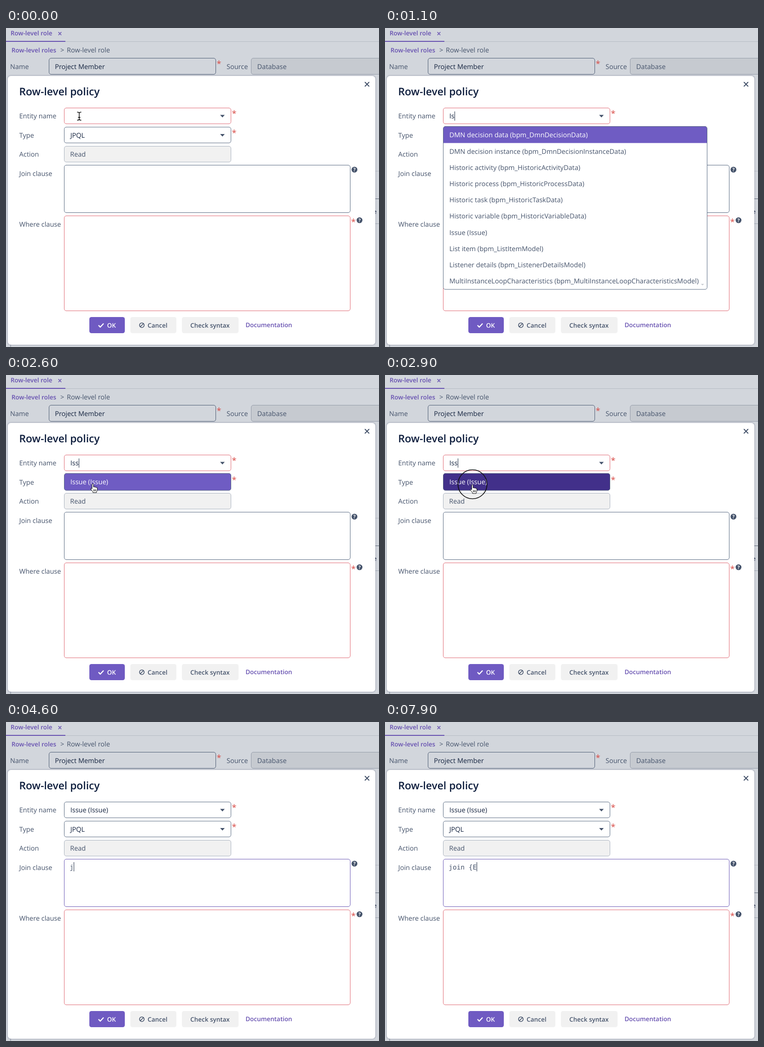
Recreate the animation shown at these times as an HTML page. Size 810 px wide and 692 px high, loop 8000 ms.

```html
<!DOCTYPE html>
<html lang="en">
<head>
<meta charset="utf-8">
<title>Row-level policy</title>
<style>
  html, body { margin: 0; width: 100%; height: 100%; overflow: hidden; background: #d2d6dc; }
  svg { display: block; width: 810px; height: 692px; }
  text { font: 14.5px "Open Sans", "Noto Sans", sans-serif; fill: #45536b; white-space: pre; text-rendering: geometricPrecision; }
  .semi { font-size: 13.45px; font-weight: 600; }
  .link { fill: #6650b0; }
  .dark { fill: #14233f; }
  .title { font-size: 22.8px; font-weight: 600; fill: #0c1c3c; }
  .mono { font: 14.45px "DejaVu Sans Mono", monospace; }
  .star { font-size: 18px; fill: #d84a45; text-anchor: middle; }
  .help { font-size: 10.5px; font-weight: 700; fill: #fff; text-anchor: middle; }
  .white { fill: #fff; }
  .field { fill: #fff; stroke: #596a82; }
  .error { stroke: #e06a75; }
  .focus { stroke: #6c5ab5; }
  .off { fill: #f1f1f1; stroke: #a9b1be; }
  .line { fill: none; stroke-linecap: round; stroke-linejoin: round; }
</style>
</head>
<body>
<svg viewBox="0 0 810 692" id="stage"></svg>
<script>
const stage = document.getElementById('stage');

function add(tag, attrs, parent = stage, content = '') {
  const node = document.createElementNS('http://www.w3.org/2000/svg', tag);
  for (const key in attrs) node.setAttribute(key, attrs[key]);
  node.textContent = content;
  parent.append(node);
  return node;
}
const label = (x, y, content, cls = '', parent = stage) => add('text', { x, y, class: cls }, parent, content);
const box = (x, y, right, bottom, attrs, parent = stage) =>
  add('rect', { x, y, width: right - x, height: bottom - y, rx: 4.5, ...attrs }, parent);
const field = (x, y, right, bottom, cls = '') => box(x, y, right, bottom, { class: 'field ' + cls });
const path = (d, attrs, parent = stage) => add('path', { d, ...attrs }, parent);
const stroke = (d, color, width) => path(d, { class: 'line', stroke: color, 'stroke-width': width });
const star = (x, y) => label(x, y + 10.3, '*', 'star');
const cross = (x, y, r, color, width) =>
  stroke(`M${x - r} ${y - r}l${2 * r} ${2 * r}M${x + r} ${y - r}l${-2 * r} ${2 * r}`, color, width);
const arrow = (x, y) => path(`M${x - 5} ${y - 2.5}h10l-5 5.5z`, { fill: '#45536b' });
function help(x, y) {
  add('circle', { cx: x, cy: y, r: 6.3, fill: '#45536b' });
  label(x, y + 3.8, '?', 'help');
}
const show = (node, visible) => { node.style.display = visible ? '' : 'none'; };

// Dimmed page
add('rect', { width: 810, height: 692, fill: '#d2d6dc' });
add('rect', { y: 29, width: 810, height: 1, fill: '#b6bbc4' });
add('rect', { y: 28, width: 129, height: 2, fill: '#6650b0' });
label(10, 16, 'Row-level role', 'semi link');
cross(117, 12.2, 2.8, '#6650b0', 1.5);
label(12, 53, 'Row-level roles', 'semi link');
label(118, 53, '>');
label(132, 53, 'Row-level role');
label(9, 88.5, 'Name');
box(93.5, 65.5, 455.5, 100.5, { fill: '#d2d6dc', stroke: '#4d5c74' });
label(106.2, 88.5, 'Project Member', 'dark');
star(462.5, 74);
label(479, 88.5, 'Source');
box(532.5, 65.5, 830, 100.5, { fill: '#c6cad0', stroke: '#949ca9' });
label(545.5, 88.5, 'Database');
for (const [y, color] of [[310, '#b6bbc4'], [370, '#596474'], [424, '#a0a7b2']])
  add('rect', { x: 790, y, width: 20, height: 1, fill: color });
label(797, 403, 'e', 'semi dark');
add('rect', { x: 9.5, y: 680, width: 1, height: 12, fill: '#7d8796' });

// Dialog
for (const spread of [3, 2, 1])
  box(4 - spread, 104 - spread, 802 + spread, 687 + spread, { fill: '#26344e', opacity: .05, rx: 7 + spread });
box(4, 104, 802, 687, { fill: '#fff', rx: 6.5 });
label(28.5, 145.8, 'Row-level policy', 'title');
cross(784, 122, 4.2, '#45536b', 2);
[['Entity name', 196], ['Type', 237.7], ['Action', 279], ['Join clause', 320.5], ['Where clause', 430.5]]
  .forEach(([name, y]) => label(28.8, y, name));

const entityBox = field(126.5, 173.5, 488.5, 207.8);
arrow(470, 191);
const entityText = label(139.7, 196, '', 'dark');
field(126.5, 215, 488.5, 249.3);
label(139.7, 237.7, 'JPQL', 'dark');
arrow(470, 232.5);
field(126.5, 256.5, 488.5, 290.8, 'off');
label(139.2, 279, 'Read');
const joinBox = field(126.5, 297.5, 747.5, 400.5);
const joinText = label(138.3, 319.5, '', 'mono');
field(126.5, 407.5, 747.5, 613.5, 'error');
star(495.5, 182);
star(495.5, 223.5);
star(754.5, 416.5);
help(756.7, 307.2);
help(767.7, 417);

box(181, 627, 258, 662, { fill: '#6f5ac2' });
stroke('M201.5 645.5l3.3 3.3 6.5-7', '#fff', 2.4);
label(219.5, 649.6, 'OK', 'semi white');
box(270, 627, 370, 662, { fill: '#f1f1f1' });
add('circle', { cx: 295, cy: 644.7, r: 5, fill: 'none', stroke: '#45536b', 'stroke-width': 1.6 });
stroke('M291.6 648.1l6.8-6.8', '#45536b', 1.6);
label(307.5, 649.6, 'Cancel', 'semi');
box(382, 627, 505, 662, { fill: '#f1f1f1' });
label(400.3, 649.6, 'Check syntax', 'semi');
label(520.2, 649, 'Documentation', 'semi link');

// Drop-down lists
function list(right, items) {
  const group = add('g', {});
  const bottom = items.length > 1 ? 567 : 250.3;
  box(126.5, 213.5, right, bottom, { fill: '#fff' }, group);
  const active = path(`M127 249.5V218q0-4.5 4.5-4.5H${right - 5}q4.5 0 4.5 4.5V249.5z`, { fill: '#6f5cc3' }, group);
  if (items.length === 1) active.setAttribute('d', `M131 213.5H${right - 4}q4 0 4 4V246q0 4-4 4H131q-4 0-4-4V217.5q0-4 4-4z`);
  box(126.5, 213.5, right, bottom, { fill: 'none', stroke: '#596a82' }, group);
  items.forEach((item, i) => label(139.7, 237.4 + i * 35.2, item, i ? '' : 'white', group));
  if (items.length > 1) path(`M${right - 13.5} 555h7l-3.5 3.5z`, { fill: '#c9cdd3' }, group);
  return { group, active };
}
const lists = {
  all: list(575.5, [
    'AbstractSingleFilterCondition (ui_AbstractSingleFilterCondition)',
    'Assignment details (bpm_AssignmentDetailsModel)',
    'AttributeResourceModel (sec_AttributeResourceModel)',
    'Business rule task (bpm_BusinessRuleTaskModel)',
    'Call activity (bpm_CallActivityModel)',
    'Call activity (bpm_SubProcessModel)',
    'ColumnDefinition (ColumnDefinition)',
    'Condition details (bpm_ConditionDetailsModel)',
    'Configuration (ui_FilterConfiguration)',
    'DMN decision data (bpm_DmnDecisionData)']),
  some: list(699.5, [
    'DMN decision data (bpm_DmnDecisionData)',
    'DMN decision instance (bpm_DmnDecisionInstanceData)',
    'Historic activity (bpm_HistoricActivityData)',
    'Historic process (bpm_HistoricProcessData)',
    'Historic task (bpm_HistoricTaskData)',
    'Historic variable (bpm_HistoricVariableData)',
    'Issue (Issue)',
    'List item (bpm_ListItemModel)',
    'Listener details (bpm_ListenerDetailsModel)',
    'MultiInstanceLoopCharacteristics (bpm_MultiInstanceLoopCharacteristicsModel)']),
  one: list(488.5, ['Issue (Issue)'])
};

// Caret, click ring and pointer
const caret = add('rect', { width: 1, height: 20, fill: '#1d2a42' });
const pointer = add('g', {});
const ring = add('circle', { r: 31.5, fill: 'none', stroke: '#111', 'stroke-width': 1.7 }, pointer);
const beam = add('g', {}, pointer);
for (const [color, width] of [['#fff', 3], ['#000', 1.4]])
  path('M-4-8.5Q-.5-8.5 0-6.5Q.5-8.5 4-8.5M0-6.5V7M-4 9Q-.5 9 0 7Q.5 9 4 9M-2 3H2',
    { class: 'line', stroke: color, 'stroke-width': width }, beam);
const hand = path('M-1.8 2.5Q-1.8 1 -.3 1T1.3 2.5V8Q3.5 6.6 4.6 8.4Q6.6 7.3 7.5 9Q9.6 8.6 9.6 11V14Q9.6 16 8 18.5V20H0V18.5Q-1.5 16.5-4.2 13Q-5.4 11-3.6 10.7Q-2.8 10.7-1.8 12zM1.7 13v4M4 13v4M6.3 13v4',
  { fill: '#fff', stroke: '#000', 'stroke-width': 1, 'stroke-linejoin': 'round' }, pointer);

// State changes: e = entity text, j = join text, c = caret visible, p = pointer visible
const steps = [
  [0, { e: '', j: '', list: '', focus: '', c: 0, p: 1, ring: 0 }],
  [100, { ring: 1, focus: 'entity', c: 1 }],
  [300, { ring: 0, list: 'all' }],
  [600, { e: 'I', p: 0 }],
  [900, { e: 'Is' }],
  [1000, { list: 'some' }],
  [1400, { c: 0 }],
  [1600, { e: 'Iss', c: 1 }],
  [1700, { list: 'one' }],
  [1900, { p: 1 }],
  [2100, { c: 0 }],
  [2600, { c: 1 }],
  [2800, { ring: 1 }],
  [3000, { ring: 0, list: '', e: 'Issue (Issue)' }],
  [3500, { c: 0 }],
  [3800, { ring: 1 }],
  [3900, { focus: 'join', c: 1 }],
  [4000, { ring: 0 }],
  [4400, { c: 0 }],
  [4600, { j: 'j', c: 1, p: 0 }],
  [4900, { j: 'jo' }],
  [5000, { j: 'joi' }],
  [5400, { j: 'join' }],
  [5700, { j: 'join ' }],
  [6300, { c: 0 }],
  [6700, { c: 1 }],
  [6800, { j: 'join {' }],
  [7400, { c: 0 }],
  [7600, { j: 'join {E', c: 1 }]
];

// Pointer stops: time, x, y
const stops = [[0, 159, 191], [1900, 159, 191], [2700, 190, 237], [3100, 190, 237], [3700, 181, 306.5], [4000, 181, 306.5], [4100, 181.5, 305.5]];

function pointerAt(t) {
  const i = stops.findIndex(stop => stop[0] > t);
  if (i < 0) return stops.at(-1).slice(1);
  const [a, b] = [stops[i - 1], stops[i]];
  const u = (t - a[0]) / (b[0] - a[0]);
  const k = u * u * (3 - 2 * u);
  return [a[1] + (b[1] - a[1]) * k, a[2] + (b[2] - a[2]) * k];
}

function draw(time) {
  const t = Math.floor(time / 100) * 100;
  const s = Object.assign({}, ...steps.filter(step => step[0] <= t).map(step => step[1]));
  entityText.textContent = s.e;
  joinText.textContent = s.j;
  const chosen = s.e.length > 3;
  entityBox.setAttribute('class', 'field ' + (!chosen ? 'error' : s.focus === 'entity' ? 'focus' : ''));
  joinBox.setAttribute('class', 'field ' + (s.focus === 'join' ? 'focus' : ''));
  for (const name in lists) show(lists[name].group, s.list === name);
  lists.one.active.setAttribute('fill', s.ring ? '#42308a' : '#6f5cc3');

  const inJoin = s.focus === 'join';
  caret.setAttribute('x', inJoin ? Math.floor(138.3 + 8.7 * s.j.length) : Math.round(139.7 + entityText.getComputedTextLength()));
  caret.setAttribute('y', inJoin ? 304 : 181);
  show(caret, s.c);

  const [x, y] = pointerAt(t);
  const overItem = y > 213 && y < 252;
  pointer.setAttribute('transform', `translate(${x} ${y})`);
  show(pointer, s.p);
  show(ring, s.ring);
  show(hand, overItem);
  show(beam, !overItem);
}

const start = performance.now();
function tick() {
  draw((performance.now() - start) % 8000);
  requestAnimationFrame(tick);
}
tick();
</script>
</body>
</html>
```
